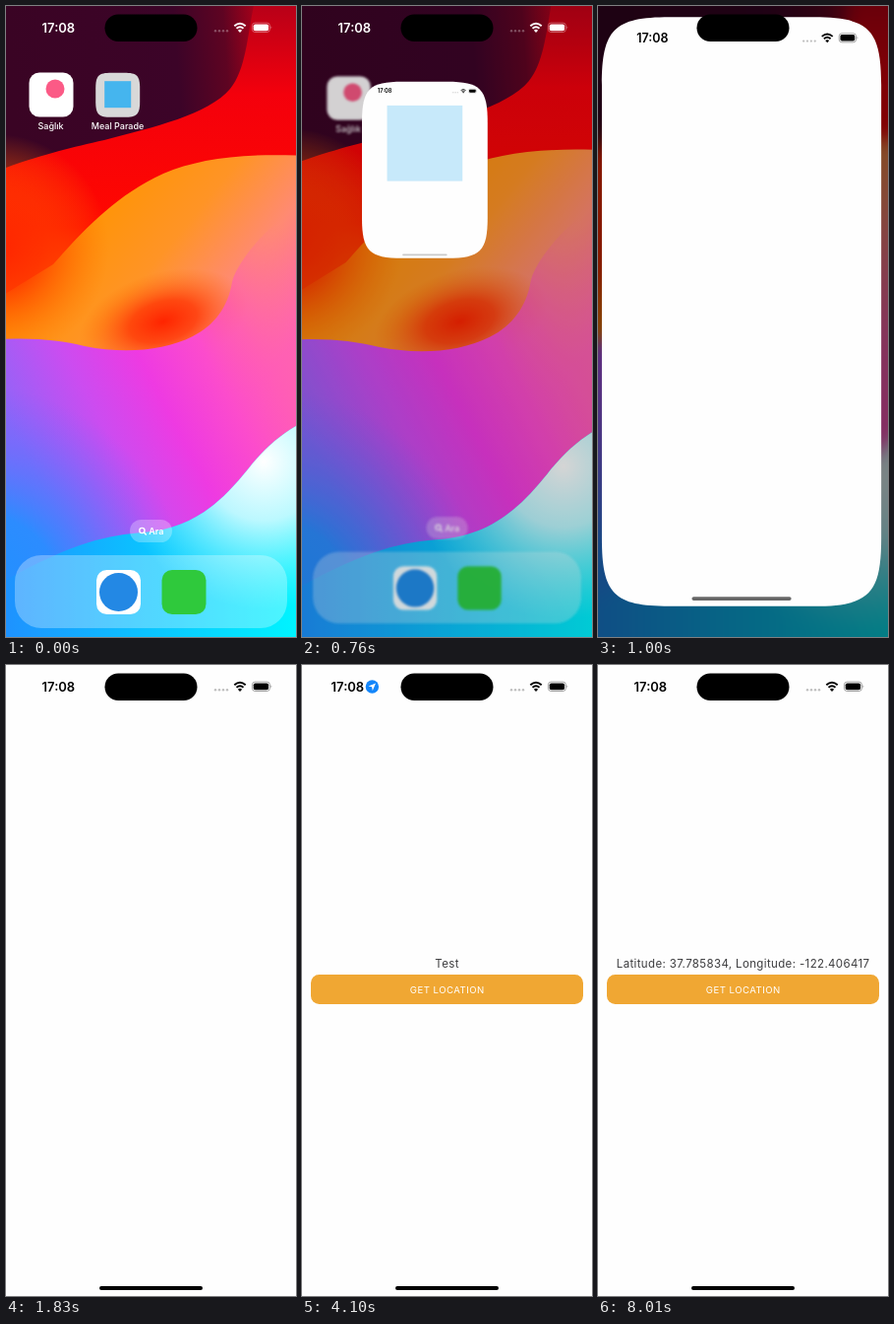
These frames come from a looping animation (295 by 640 pixels, 8.05 s). An HTML page:

```html
<!DOCTYPE html>
<html lang="tr">
<head>
<meta charset="utf-8">
<title>Location demo</title>
<style>
html, body { margin: 0; width: 100%; height: 100%; overflow: hidden; background: #fff; }
svg { display: block; width: 100vw; height: 100vh; }
text { font-family: Inter, Roboto, sans-serif; text-anchor: middle; }
.clock { font-size: 13px; font-weight: 600; }
.label { font-size: 9px; font-weight: 500; fill: #fff; }
#wall, #icons { transform-origin: 147.5px 320px; }
#info { font-size: 11.5px; letter-spacing: .36px; fill: #3c3c3e; }
#cta { font-size: 9.6px; letter-spacing: .48px; fill: #fff; }
</style>
</head>
<body>
<svg viewBox="0 0 295 640" preserveAspectRatio="none" xmlns="http://www.w3.org/2000/svg">
  <defs>
    <linearGradient id="red" gradientUnits="userSpaceOnUse" x1="0" y1="0" x2="0" y2="345">
      <stop offset="0" stop-color="#b80018"/><stop offset=".26" stop-color="#f4000c"/>
      <stop offset=".65" stop-color="#ff0800"/><stop offset=".95" stop-color="#ff7800"/>
    </linearGradient>
    <linearGradient id="dark" gradientUnits="userSpaceOnUse" x1="0" y1="20" x2="262" y2="0">
      <stop offset="0" stop-color="#3a0424"/><stop offset=".65" stop-color="#3c0428"/>
      <stop offset=".84" stop-color="#5e0422"/><stop offset="1" stop-color="#b80018"/>
    </linearGradient>
    <linearGradient id="orange" gradientUnits="userSpaceOnUse" x1="90" y1="180" x2="290" y2="345">
      <stop offset="0" stop-color="#ff9400"/><stop offset=".38" stop-color="#ff9426"/>
      <stop offset=".66" stop-color="#ff8a72"/><stop offset="1" stop-color="#ff5cbc"/>
    </linearGradient>
    <radialGradient id="ember">
      <stop offset="0" stop-color="#ff2400"/><stop offset=".4" stop-color="#ff3600" stop-opacity=".8"/>
      <stop offset="1" stop-color="#ff7000" stop-opacity="0"/>
    </radialGradient>
    <linearGradient id="purple" gradientUnits="userSpaceOnUse" x1="0" y1="420" x2="300" y2="260">
      <stop offset="0" stop-color="#8e66f8"/><stop offset=".25" stop-color="#cc4cf0"/>
      <stop offset=".44" stop-color="#ee3ae2"/><stop offset=".62" stop-color="#fc4ccc"/>
      <stop offset=".75" stop-color="#ff5ab8" stop-opacity=".8"/><stop offset="1" stop-color="#ff7890" stop-opacity="0"/>
    </linearGradient>
    <radialGradient id="blue" gradientUnits="userSpaceOnUse" cx="-30" cy="600" r="215">
      <stop offset="0" stop-color="#1e92ff"/><stop offset=".4" stop-color="#2c8cff"/>
      <stop offset="1" stop-color="#7a60ff" stop-opacity="0"/>
    </radialGradient>
    <linearGradient id="cyan" gradientUnits="userSpaceOnUse" x1="0" y1="0" x2="295" y2="0">
      <stop offset="0" stop-color="#1e92ff"/><stop offset=".45" stop-color="#0cc0ff"/>
      <stop offset="1" stop-color="#00f4ff"/>
    </linearGradient>
    <radialGradient id="glow" gradientUnits="userSpaceOnUse" cx="262" cy="462" r="150">
      <stop offset="0" stop-color="#fff"/><stop offset=".4" stop-color="#dcfbff" stop-opacity=".85"/>
      <stop offset="1" stop-color="#80f4ff" stop-opacity="0"/>
    </radialGradient>
    <path id="shore" d="M325 412C290 425 268 442 246 470C217 506 188 530 140 534C100 537 60 545-30 600V670H325Z"/>
  </defs>

  <g id="home">
    <g id="wall">
      <rect x="-30" y="-30" width="355" height="700" fill="url(#red)"/>
      <path fill="url(#dark)" d="M-30-30H262C245 0 250 58 228 84C206 110 150 123 100 136C60 145 30 152-30 175Z"/>
      <path fill="url(#orange)" d="M325 153C250 148 200 153 160 170C112 192 80 226 48 262L-30 310V480H325Z"/>
      <circle cx="-10" cy="245" r="115" fill="url(#ember)"/>
      <ellipse cx="160" cy="320" rx="88" ry="50" transform="rotate(-16 160 320)" fill="url(#ember)"/>
      <path fill="url(#purple)" d="M-30 340C20 335 50 338 80 345C120 353 160 350 190 335C212 324 226 305 230 280C236 255 280 205 325 190V670H-30Z"/>
      <rect x="-30" y="345" width="300" height="325" fill="url(#blue)"/>
      <use href="#shore" fill="url(#cyan)"/>
      <use href="#shore" fill="url(#glow)"/>
    </g>
    <g id="icons">
      <rect x="23.5" y="67.5" width="45" height="45" rx="10.5" fill="#fff"/>
      <circle cx="50" cy="84" r="9.5" fill="#fb5a86"/>
      <text class="label" x="45.5" y="125">Sağlık</text>
      <text class="label" id="appName" x="113.5" y="125">Meal Parade</text>
      <rect x="126" y="521" width="43" height="23" rx="11.5" fill="#fff" fill-opacity=".27"/>
      <g fill="none" stroke="#fff" stroke-width="1.4" stroke-linecap="round">
        <circle cx="138.4" cy="532" r="2.6"/><path d="M140.4 534.1L142.3 536"/>
      </g>
      <text class="label" x="152.8" y="535.8" style="font-weight:600">Ara</text>
      <rect x="9" y="557" width="277" height="74" rx="27" fill="#fff" fill-opacity=".29"/>
      <rect x="92" y="572" width="45" height="45" rx="10.5" fill="#fff"/>
      <circle cx="114.5" cy="594.5" r="19.5" fill="#2388e4"/>
      <rect x="158.5" y="572" width="45" height="45" rx="10.5" fill="#2fc93c"/>
    </g>
    <g id="homeBar" fill="#fff" color="#fff"></g>
  </g>

  <path id="pane"/>
  <rect id="mark" x="9" y="8.5" width="27" height="27" fill="#45b5ee"/>
  <g id="page">
    <text id="info" x="147.6" y="306.5"></text>
    <rect x="9" y="314" width="277" height="30" rx="8.5" fill="#f0a733"/>
    <text id="cta" x="147.8" y="332.5">GET LOCATION</text>
    <rect id="press" x="9" y="314" width="277" height="30" rx="8.5" fill="#fff"/>
  </g>
  <g id="appBar" fill="#000" color="#000"></g>
  <g id="badge">
    <circle r="6.7" fill="#1486fa"/>
    <path fill="#fff" d="M3.6-3.6L-3.9-.4L-.3.3L.4 3.9Z"/>
  </g>
  <rect id="grip" fill="#000"/>
  <rect x="100.5" y="8.5" width="94" height="27.5" rx="13.75" fill="#000"/>
</svg>
<script>
const LOOP = 8050, OPEN = 440, FRAME = 111.4;
const $ = id => document.getElementById(id);
const mix = (a, b, k) => a + (b - a) * k;
const clamp = v => Math.max(0, Math.min(1, v));
const ease = k => k * k * (3 - 2 * k);
const set = (id, attrs) => { for (const k in attrs) $(id).setAttribute(k, attrs[k]); };

// Whole ticks since a moment; the slack absorbs uneven tick lengths.
const ticks = (t, from, length) => t < from ? -1 : Math.floor((t - from + 20) / length);

// Progress that jumps n times, the last jump (to 1) falling on `to`.
const phase = (t, from, to, n) => clamp((ticks(t, from, (to - from) / (n - 1)) + 1) / n);

// S-shaped growth of the opening window, half done at tick `mid`.
function growth(t, mid) {
  const k = ticks(t, OPEN, FRAME);
  if (k < 0) return 0;
  return k > 7 ? 1 : 1 / (1 + Math.exp(-1.9 * (k - mid)));
}

function statusBar(dots) {
  const cells = [0, 1, 2, 3].map(i => `<circle cx="${213 + 4 * i}" cy="25.2" r="1.2"/>`).join('');
  return `<text class="clock" x="53.4" y="26.7">17:08</text>
    <g fill-opacity="${dots}">${cells}</g>
    <path fill="none" stroke="currentColor" stroke-width="1.9"
      d="M232.3 20.3Q238 15.3 243.7 20.3M234.5 22.8Q238 19.7 241.5 22.8"/>
    <path d="M238 27L235.9 24.7Q238 23 240.1 24.7Z"/>
    <rect x="250.4" y="17.1" width="18" height="9.4" rx="3" fill="none" stroke="currentColor" stroke-opacity=".4" stroke-width=".9"/>
    <rect x="251.7" y="18.4" width="15.4" height="6.8" rx="1.9"/>
    <path d="M269.5 20.3Q271.3 21.8 269.5 23.3Z" fill-opacity=".45"/>`;
}

// Rectangle with continuous-curvature corners.
function squircle(x, y, w, h, r) {
  const e = Math.min(1.53 * r, w / 2, h / 2), c = .18 * e, d = e - c;
  return `M${x + e} ${y}h${w - 2 * e}c${d} 0 ${e} ${c} ${e} ${e}v${h - 2 * e}c0 ${d} ${-c} ${e} ${-e} ${e}
    h${2 * e - w}c${-d} 0 ${-e} ${-c} ${-e} ${-e}v${2 * e - h}c0 ${-d} ${c} ${-e} ${e} ${-e}z`;
}

function drawHome(p) {
  const look = (id, scale, blur, light) => {
    $(id).style.transform = `scale(${scale})`;
    $(id).style.filter = p ? `blur(${blur}px) brightness(${light})` : 'none';
  };
  look('wall', 1 + .1 * p, 9 * p ** 4, 1 - .5 * p);
  look('icons', 1 - .045 * p, 3.6 * p, 1 - .4 * p);
  set('icons', { opacity: 1 - clamp((p - .3) * 1.6) });
  set('appName', { opacity: 1 - clamp(p * 8) });
  set('homeBar', { opacity: 1 - clamp((p - .4) * 2.2) });
}

function drawWindow(p, q, settle) {
  const w = mix(45, 295, p), h = mix(45, 640, q), s = w / 295;
  const x = mix(113.7, 147.5, p) - w / 2, y = mix(90.2, 320, p) - h / 2;
  const shade = mix(216, 254, clamp(p * 5));
  const move = k => `translate(${x} ${y}) scale(${k})`;
  set('pane', {
    d: squircle(x, y, w, h, mix(10.5, 46, p ** .7) * (1 - settle)),
    fill: `rgb(${shade},${shade},${shade})`
  });
  set('mark', { transform: move(w / 45), opacity: (1 - p) ** 3 });
  set('appBar', { transform: move(s), opacity: clamp((p - .04) * 5) });
  set('grip', {
    x: x + 95 * s, y: y + h - 10 * s, width: 105 * s, height: 4 * s, rx: 2 * s,
    opacity: .62 * p + .38 * settle
  });
}

function drawPage(t) {
  const shown = phase(t, 3450, 4100, 7);
  const badge = ease(shown) * (1 - ease(phase(t, 7590, 8010, 5)));
  set('page', { opacity: ease(shown) });
  set('press', { opacity: .22 * Math.sin(Math.PI * phase(t, 5330, 5820, 5)) });
  $('info').textContent = t < 5450 ? 'Test' : 'Latitude: 37.785834, Longitude: -122.406417';
  $('appBar').firstChild.setAttribute('x', 53.4 - 7 * badge);
  set('badge', { transform: `translate(71.4 22) scale(${mix(.4, 1, badge)})`, opacity: badge });
}

function draw(t) {
  const p = growth(t, 3.37), settle = phase(t, 1510, 1830, 4);
  $('home').style.display = settle < 1 ? '' : 'none';
  drawHome(p);
  drawWindow(p, growth(t, 3.65), settle);
  drawPage(t);
}

$('homeBar').innerHTML = statusBar(.3);
$('appBar').innerHTML = statusBar(.25);
const start = performance.now();
function tick() {
  draw((performance.now() - start) % LOOP);
  requestAnimationFrame(tick);
}
tick();
</script>
</body>
</html>
```
